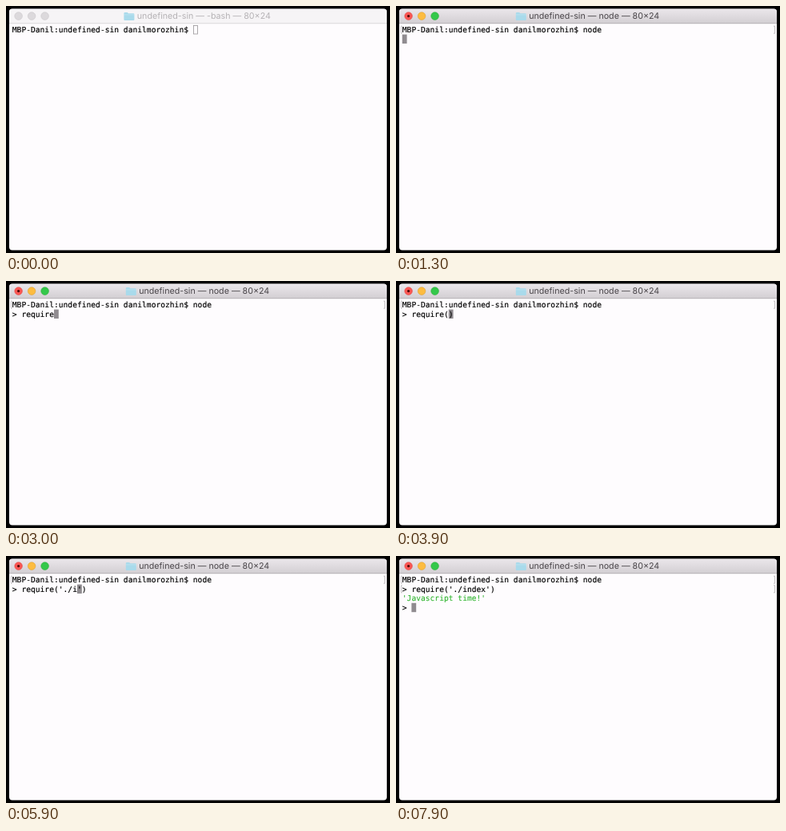
Animation of 480 by 309 pixels, one loop 8000 ms. Source, as an HTML page:

```html
<!DOCTYPE html>
<html lang="en">
<head>
<meta charset="utf-8">
<title>Terminal session</title>
<style>
  html, body { margin: 0; width: 100%; height: 100%; overflow: hidden; background: #000; }
  svg { display: block; width: 480px; height: 309px; }
  text { white-space: pre; text-rendering: geometricPrecision; }
  .mono { font: 9.634px "DejaVu Sans Mono", monospace; fill: #000; stroke: #000; stroke-width: .15px; }
  #out { fill: #2fb52f; stroke: #2fb52f; stroke-width: .08px; }
  #title { font: 10.7px Inter, sans-serif; }
  .bracket { fill: none; stroke: #b9b6b9; stroke-width: .9; }
</style>
</head>
<body>
<svg viewBox="0 0 480 309" xmlns="http://www.w3.org/2000/svg">
  <defs>
    <linearGradient id="bar" x1="0" y1="0" x2="0" y2="1">
      <stop offset="0" stop-color="#ebe7eb"/>
      <stop offset="1" stop-color="#d2ced2"/>
    </linearGradient>
    <clipPath id="frame"><rect x="4" y="3.5" width="472" height="302" rx="4"/></clipPath>
  </defs>
  <rect width="480" height="309" fill="#000"/>
  <g clip-path="url(#frame)">
    <rect x="4" y="3" width="472" height="303" fill="#fefcfe"/>
    <rect id="head" x="4" y="3.5" width="472" height="18.5"/>
    <rect id="rule" x="4" y="21.4" width="472" height=".8"/>
  </g>
  <g id="lights" stroke-width=".6">
    <circle cx="15.6" cy="12.6" r="4.8"/>
    <circle cx="32.1" cy="12.6" r="4.8"/>
    <circle cx="48.6" cy="12.6" r="4.8"/>
  </g>
  <circle id="dot" cx="15.6" cy="12.6" r="1.6" fill="#4c0505"/>
  <g id="folder">
    <path d="M0 9V1.2Q0 0 1.2 0H4.3L5.6 1.3H11.8Q13 1.3 13 2.5V9Q13 10 12 10H1Q0 10 0 9Z"/>
    <path d="M0 2.9H13" stroke="#fff" stroke-opacity=".35" stroke-width=".6"/>
  </g>
  <text id="title" y="16.4"></text>
  <rect id="cursor" width="5.8" height="11.4"/>
  <g id="marks1" class="bracket"><path d="M7.8 25.2H6.4V34.2H7.8M472 25.2H473.6V34.2H472"/></g>
  <g id="marks2" class="bracket"><path d="M7.8 36.8H6.4V45.8H7.8M472 36.8H473.6V45.8H472"/></g>
  <text id="shell" class="mono" x="7.8" y="33"></text>
  <text id="repl" class="mono" x="7.8" y="44.6"></text>
  <text id="out" class="mono" x="7.8" y="56.2"></text>
  <text id="next" class="mono" x="7.8" y="67.8"></text>
</svg>
<script>
const LOOP = 8000, CELL = 5.8, ROW = 11.6, LEFT = 7.8, TOP = 24;
const FOCUS = 100, RUN = 1300, READY = 1500, ENTER = 6700, RESULT = 6900, PROMPT = 7000;
const HOST = "MBP-Danil:undefined-sin danilmorozhin$ ";
const BACK = "<";

// Each key: [time, character], BACK moves the caret left.
const shellKeys = [[500, "n"], [700, "o"], [900, "d"], [1000, "e"]];
const replKeys = [
  [2600, "r"], [2600, "e"], [2700, "q"], [2800, "u"], [2800, "i"], [2900, "r"], [3000, "e"],
  [3200, "("], [3300, ")"], [3700, BACK], [4600, "'"], [4800, "'"], [5000, BACK],
  [5500, "."], [5600, "/"],
  [5900, "i"], [6000, "n"], [6200, "d"], [6300, "e"], [6400, "x"]
];

const el = id => document.getElementById(id);
const set = (id, attrs) => {
  for (const name in attrs) el(id).setAttribute(name, attrs[name]);
};
const show = (id, on) => set(id, { visibility: on ? "visible" : "hidden" });

function type(keys, t) {
  let text = "", caret = 0;
  for (const [at, key] of keys) {
    if (at > t) break;
    if (key === BACK) caret--;
    else {
      text = text.slice(0, caret) + key + text.slice(caret);
      caret++;
    }
  }
  return { text, caret };
}

function caretCell(t, shell, repl) {
  if (t < RUN) return [HOST.length + shell.caret, 0];
  if (t < READY) return [0, 1];
  if (t < ENTER) return [2 + repl.caret, 1];
  if (t < RESULT) return [0, 2];
  return [t < PROMPT ? 0 : 2, 3];
}

function drawWindow(active, running) {
  set("head", { fill: active ? "url(#bar)" : "#f6f4f6" });
  set("rule", { fill: active ? "#aeaaae" : "#d5d2d5" });
  const fills = active ? ["#fc5753", "#fdbc40", "#34c84a"] : Array(3).fill("#dcd9dc");
  const edges = active ? ["#df4744", "#de9f34", "#27aa35"] : Array(3).fill("#cac7ca");
  [...el("lights").children].forEach((c, i) => {
    c.setAttribute("fill", fills[i]);
    c.setAttribute("stroke", edges[i]);
  });
  show("dot", running);
  const x = running ? 166.2 : 163.8;
  set("folder", {
    transform: `translate(${x - 16.4} 8)`,
    fill: active && !running ? "#78cdf0" : "#a9daeb"
  });
  set("title", { x, fill: active ? "#484448" : "#b5b2b5" });
  el("title").textContent = `undefined-sin — ${running ? "node" : "-bash"} — 80×24`;
}

function draw(t) {
  const active = t >= FOCUS, running = t >= RUN;
  const shell = type(shellKeys, t), repl = type(replKeys, t);
  drawWindow(active, running);
  show("marks1", running);
  show("marks2", t >= ENTER);
  el("shell").textContent = HOST + shell.text;
  el("repl").textContent = t >= READY ? "> " + repl.text : "";
  el("out").textContent = t >= RESULT ? "'Javascript time!'" : "";
  el("next").textContent = t >= PROMPT ? "> " : "";

  const [col, row] = caretCell(t, shell, repl);
  const inset = active ? 0 : 0.4;
  set("cursor", {
    x: LEFT + col * CELL + inset,
    y: TOP + row * ROW + inset,
    width: CELL - 2 * inset,
    height: 11.4 - 2 * inset,
    fill: active ? "#908c90" : "none",
    stroke: active ? "none" : "#989498",
    "stroke-width": 0.8
  });
}

const start = performance.now();
function tick() {
  draw((performance.now() - start) % LOOP);
  requestAnimationFrame(tick);
}
draw(0);
requestAnimationFrame(tick);
</script>
</body>
</html>
```
